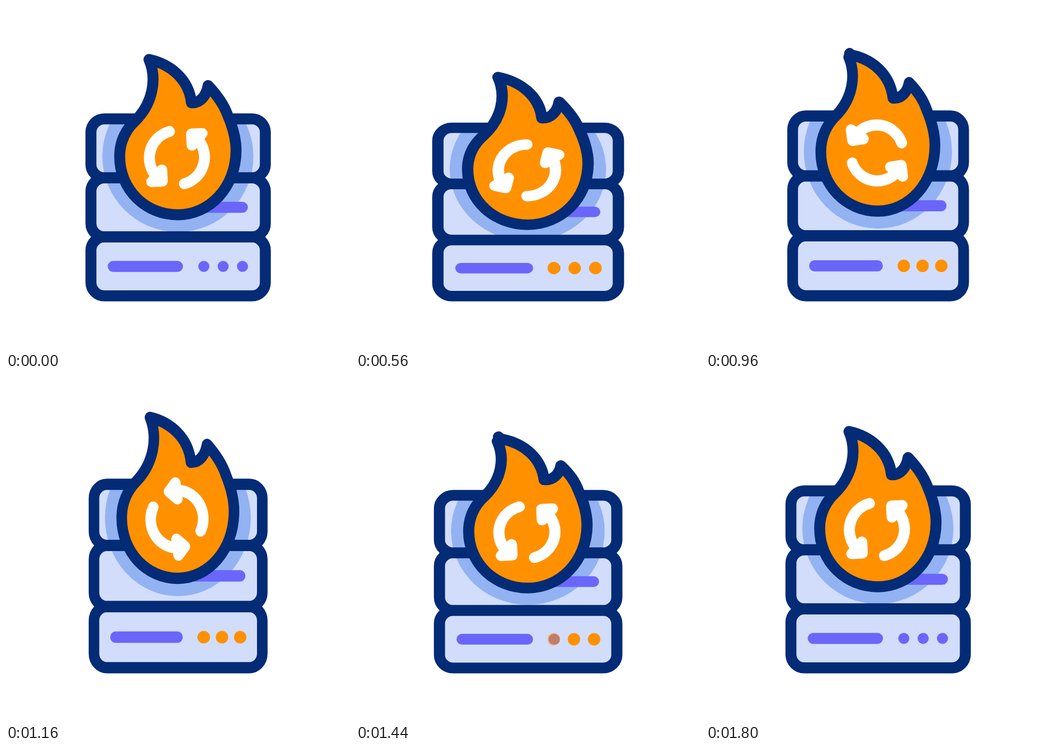
Write an HTML page that moves like this. It is 640 px wide and 640 px high and loops after 2000 ms.

```html
<!DOCTYPE html>
<html lang="en">
<head>
<meta charset="utf-8">
<title>Server on fire</title>
<style>
  html, body { margin: 0; width: 100%; height: 100%; overflow: hidden; background: #fff; }
  svg { display: block; width: 100%; height: 100%; }
  .ink { stroke: #042b75; stroke-width: 20.4; stroke-linejoin: round; }
  .bar { stroke: #6b66fa; stroke-width: 20.5; stroke-linecap: round; }
</style>
</head>
<body>
<svg viewBox="0 0 640 640">
  <defs>
    <rect id="unit" x="158" width="324.5" height="109.7" rx="25"/>
    <clipPath id="upperUnits">
      <use href="#unit" y="210"/><use href="#unit" y="319.8"/>
    </clipPath>
    <g id="arrow" stroke="#fff" stroke-width="20.5" stroke-linecap="round" stroke-linejoin="round">
      <path d="M-14 -48.5A51 51 0 0 0 -37 36" fill="none"/>
      <path d="M-47 45L-27 44L-28 23Z" fill="#fff" stroke-width="20"/>
    </g>
  </defs>
  <g id="body">
    <g fill="#d2ddfc">
      <use href="#unit" y="210"/><use href="#unit" y="319.8"/><use href="#unit" y="429.6"/>
    </g>
    <g clip-path="url(#upperUnits)">
      <circle id="halo" cx="319.8" cy="280" r="140.5" fill="#93b2f2"/>
    </g>
    <path class="bar" d="M320 374.5H439.8M199.5 484.5H319"/>
    <g fill="#6b66fa">
      <circle cx="368" cy="484.5" r="10.3"/><circle cx="404" cy="484.5" r="10.3"/><circle cx="440" cy="484.5" r="10.3"/>
    </g>
    <g class="ink" fill="none">
      <use href="#unit" y="210"/><use href="#unit" y="319.8"/><use href="#unit" y="429.6"/>
    </g>
  </g>
  <g id="lights" fill="#ff9100">
    <circle r="11.6"/><circle r="11.6"/><circle r="11.6"/>
  </g>
  <g id="fire">
    <path id="flame" class="ink" fill="#ff9100"/>
    <g id="arrows"><use href="#arrow"/><use href="#arrow" transform="rotate(180)"/></g>
  </g>
</svg>
<script>
const LOOP = 2000, STEP = 20, FLOOR = 549, MID = 320;
const $ = id => document.getElementById(id);
const clamp = v => Math.max(0, Math.min(1, v));

// Monotone cubic through [time, value] keys, flat at every extreme.
function track(...keys) {
  const secant = i => (keys[i + 1][1] - keys[i][1]) / (keys[i + 1][0] - keys[i][0]);
  const slopes = keys.map((_, i) => {
    if (i === 0 || i === keys.length - 1) return 0;
    const a = secant(i - 1), b = secant(i);
    return a * b <= 0 ? 0 : 2 * a * b / (a + b);
  });
  return t => {
    if (t <= keys[0][0]) return keys[0][1];
    const i = keys.findIndex(k => k[0] >= t) - 1;
    if (i < 0) return keys[keys.length - 1][1];
    const [t0, v0] = keys[i], [t1, v1] = keys[i + 1];
    const d = t1 - t0, u = (t - t0) / d, w = 1 - u;
    return v0 * w * w * (1 + 2 * u) + v1 * u * u * (3 - 2 * u)
      + d * u * w * (slopes[i] * w - slopes[i + 1] * u);
  };
}

const scaleX = track([200, 1], [300, 1.022], [460, 1.041], [560, 1.035], [800, .998],
  [1160, .965], [1260, .962], [1440, 1.017], [1560, 1.041], [1800, 1]);
const scaleY = track([200, 1], [300, .971], [460, .943], [560, .951], [800, .994],
  [1160, 1.036], [1260, 1.04], [1440, .9756], [1560, .943], [1800, 1]);
const fireDrop = track([200, 0], [300, 2.6], [540, 10.8], [560, 10.6], [800, 2],
  [1160, -10], [1265, -10.6], [1440, -1.6], [1580, 5], [1800, 0]);
const turn = track([300, 0], [560, 16], [800, 51], [1160, 131], [1400, 180]);
const flicker = track([580, 0], [800, 1], [1040, 0], [1300, 0], [1440, .35], [1510, .4], [1700, 0]);
const pinch = track([200, 0], [300, 1], [330, 1], [520, 0]);
const light = (t, i) => clamp((t - 200 - 82 * i) / 100) - clamp((t - 1397 - 82 * i) / 100);

// Each point: rest position, shift by flicker f, shift by pinch n.
function flamePath(f, n) {
  const p = (x, y, fx = 0, fy = 0, nx = 0, ny = 0) =>
    `${(x + f * fx + n * nx).toFixed(2)} ${(y + f * fy + n * ny).toFixed(2)} `;
  return 'M' + p(266, 99.5, -6, 26)
    + 'Q' + p(266, 99.5, 3, 14) + p(266, 99.5, 0, 1.5)
    + 'Q' + p(266, 99.5, 9, 12) + p(266, 99.5, 24, 15)
    + 'C' + p(305, 108, 20, 14, -2, -1) + p(340, 135, 12, 13, -6, -4) + p(345, 180, 13, 6, -7.5, -7)
    + 'C' + p(362, 181, 13, 7, -8, -6) + p(373, 166, 12, 14, -8, -4) + p(376, 148, 12, 20, -8, -4)
    + 'C' + p(392, 165, 8, 12, -8, -2) + p(405, 183, 4, 6, -8, 2) + p(412, 202, 0, 0, -6, 5)
    + 'L' + p(412, 202, 0, 0, 0, 6)
    + 'C' + p(422, 225) + p(428, 247) + p(428, 268)
    + 'C' + p(428, 338) + p(378, 388.5) + p(319.8, 388.5)
    + 'C' + p(259, 388.5) + p(211.5, 341) + p(211.5, 280)
    + 'C' + p(211.5, 250) + p(225, 228) + p(241, 213)
    + 'L' + p(241, 213, 0, 0, 4, -4)
    + 'C' + p(272, 182, -3, 2) + p(282, 137, -10, 14) + p(266, 99.5, -6, 26) + 'Z';
}

function render(t) {
  const sx = scaleX(t), sy = scaleY(t), drop = fireDrop(t) / sy;
  const squash = `translate(${MID} ${FLOOR}) scale(${sx} ${sy}) translate(${-MID} ${-FLOOR})`;
  $('body').setAttribute('transform', squash);
  $('halo').setAttribute('transform', `translate(0 ${drop})`);
  $('fire').setAttribute('transform', `${squash} translate(0 ${drop})`);
  $('flame').setAttribute('d', flamePath(flicker(t), pinch(t)));
  $('arrows').setAttribute('transform', `translate(318 282) rotate(${turn(t)})`);
  const gap = 36.3 + 71 * (sx - 1);
  [...$('lights').children].forEach((dot, i) => {
    dot.setAttribute('cx', 368 + gap * i);
    dot.setAttribute('cy', FLOOR - 64.5 * sy);
    dot.setAttribute('opacity', light(t, i));
  });
}

const start = performance.now();
function tick() {
  const t = (performance.now() - start) % LOOP;
  render(Math.floor(t / STEP) * STEP);
  requestAnimationFrame(tick);
}
tick();
</script>
</body>
</html>
```
